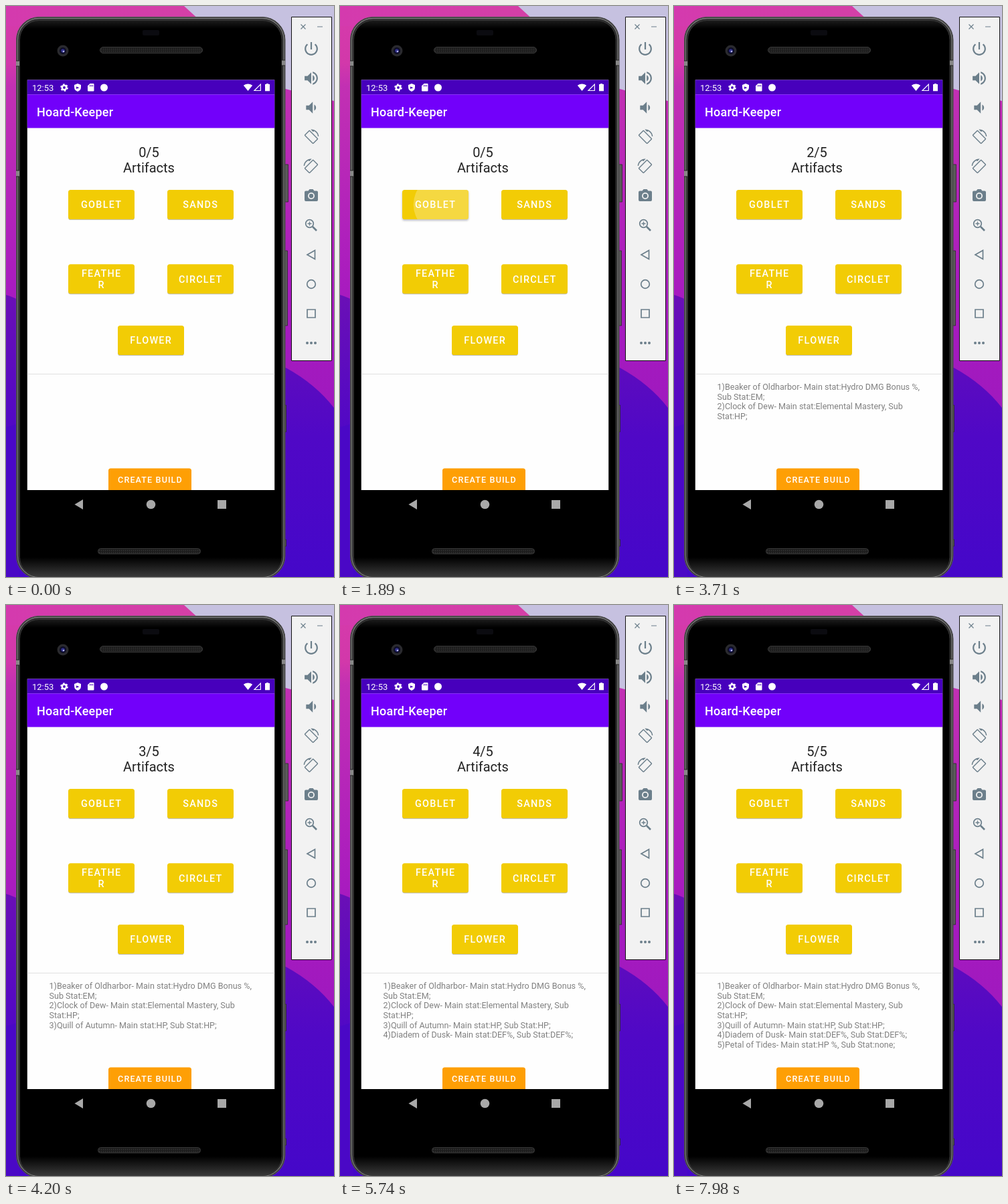
These frames come from a looping animation (490 by 854 pixels, 8 s). An HTML page:

```html
<!DOCTYPE html>
<html lang="en">
<head>
<meta charset="utf-8">
<title>Artifact builder</title>
<style>
html, body { margin: 0; width: 100%; height: 100%; overflow: hidden; background: #000; }
svg { display: block; width: 490px; height: 854px; font-family: Roboto, sans-serif; }
.label { fill: #fff; font-weight: 500; text-anchor: middle; }
.tool { fill: #6c7f8b; }
.line { fill: none; stroke: #6c7f8b; stroke-width: 1.7; }
</style>
</head>
<body>
<svg viewBox="0 0 490 854">
  <defs>
    <linearGradient id="pink" x2="0" y2="1">
      <stop offset="0" stop-color="#d63bab"/><stop offset=".1" stop-color="#d238aa"/>
      <stop offset=".14" stop-color="#c230b3"/><stop offset=".5" stop-color="#a81bbf"/>
      <stop offset="1" stop-color="#9316bd"/>
    </linearGradient>
    <linearGradient id="violet" x2="0" y2="1">
      <stop offset="0" stop-color="#6a0fb6"/><stop offset=".5" stop-color="#5008c6"/><stop offset="1" stop-color="#4507c9"/>
    </linearGradient>
    <linearGradient id="top"><stop offset="0" stop-color="#d43aae"/><stop offset="1" stop-color="#d440a6"/></linearGradient>
    <linearGradient id="face" x2="0" y2="1">
      <stop offset="0" stop-color="#1c1c1c"/><stop offset=".015" stop-color="#000"/>
      <stop offset=".965" stop-color="#000"/><stop offset="1" stop-color="#3a3a3a"/>
    </linearGradient>
    <pattern id="mesh" width="3" height="3" patternUnits="userSpaceOnUse">
      <path d="M0 0H3V3H0Z" fill="#1c1c1c"/><circle cx="1.5" cy="1.5" r=".8" fill="#3b3b3b"/>
    </pattern>
    <clipPath id="screen"><path d="M31.800 110.500H401.200V724H31.800Z"/></clipPath>
    <clipPath id="press"><rect id="pressBox" width="99" height="44" rx="3.6"/></clipPath>
  </defs>

  <!-- wallpaper -->
  <path d="M0 0H490V854H0Z" fill="url(#pink)"/>
  <path d="M0 0H300V30H0Z" fill="url(#top)"/>
  <path d="M266 0H490V142Q455 134 410 122L290 22Z" fill="#c6c1e0"/>
  <path d="M0 432Q14 436 30 446V560H300L418 541Q462 565 490 601V854H0Z" fill="url(#violet)"/>
  <path d="M0 630L20 624V854H0Z" fill="#4a08c6"/>

  <!-- phone -->
  <g fill="#5a5a5a" stroke="#222" stroke-width=".7">
    <path d="M415 237h6.500v56H415ZM414 366h6.500v112H414ZM415 597h3.500v40H415ZM415 798h3.500v10H415Z"/>
  </g>
  <rect x="15.500" y="16.500" width="401.500" height="840" rx="34" fill="#2b2b2b" stroke="#555"/>
  <rect x="17.500" y="18.500" width="397.500" height="836" rx="32" fill="none" stroke="#7c7c7c" stroke-width="1.300"/>
  <rect x="20.500" y="21.500" width="391.500" height="832" rx="29" fill="url(#face)" stroke="#3c3c3c" stroke-width=".8"/>
  <path d="M15 82h5v8h-5ZM15 246h5v9h-5ZM412 81h5v8h-5Z" fill="#888"/>
  <path d="M15 82h5M15 90h5M15 246h5M15 255h5M412 81h5M412 89h5" stroke="#222"/>
  <rect x="204" y="36" width="25" height="8" rx="2" fill="#0b0b10"/>
  <g fill="url(#mesh)" stroke="#3a3a3a">
    <rect x="140.500" y="61.500" width="153" height="9" rx="4.500"/>
    <rect x="137.500" y="811.500" width="153" height="8" rx="4"/>
  </g>
  <circle cx="85" cy="67" r="8.500" fill="#2a2a2e"/>
  <circle cx="85" cy="67" r="5" fill="#0c0c25"/>
  <circle cx="85" cy="67" r="2.800" fill="#30308a"/>
  <circle cx="86" cy="68" r="1.300" fill="#b9b9f0"/>

  <!-- app -->
  <g clip-path="url(#screen)">
    <path d="M31 110H402V724H31Z" fill="#fefefe"/>
    <path d="M31 110H402V132.300H31Z" fill="#4700bc"/>
    <path d="M31 132.300H402V182.600H31Z" fill="#7200fa"/>
    <path d="M31 550.500H402" stroke="#e1e1e1"/>
    <g fill="#fff">
      <text x="39" y="127" font-size="13">12:53</text>
      <text x="46" y="164.500" font-size="18" font-weight="500" letter-spacing=".22">Hoard-Keeper</text>
      <circle cx="87" cy="122" r="3.200" fill="none" stroke="#fff" stroke-width="2.600"/>
      <circle cx="87" cy="122" r="5" fill="none" stroke="#fff" stroke-width="1.600" stroke-dasharray="2.600 2.636"/>
      <path d="M107 116l5 2v3.500q0 4.500-5 6.500q-5-2-5-6.500V118Z"/>
      <path d="M105 120.500l4.500 1.700l-4.500 1.700Z" fill="#4700bc"/>
      <path d="M125.500 116h5q1 0 1 1v9.500q0 1-1 1h-7.500q-1 0-1-1V119.500Z"/>
      <path d="M125.500 118v2.500M127.500 118v2.500M129.500 118v2.500" stroke="#4700bc" stroke-width=".9"/>
      <circle cx="146.500" cy="122" r="5.500"/>
      <path d="M354.800 118.700q6.700-4.400 13.400 0L361.500 127Z"/>
      <path d="M371 126.500h9.300v-9.300Z" fill="none" stroke="#fff" stroke-width="1.200"/>
      <path d="M389 116h3v1h2v10.300h-7V117h2Z"/>
    </g>
    <g fill="#222" font-size="20" text-anchor="middle">
      <text id="count" x="213.500" y="225.500">0/5</text>
      <text x="213.500" y="249">Artifacts</text>
    </g>
    <g id="buttons"></g>
    <g clip-path="url(#press)"><circle id="ripple" fill="#fff"/></g>
    <g id="labels" class="label" font-size="14.400" letter-spacing="1.280"></g>
    <g id="list" fill="#808080" font-size="12.570"></g>
    <rect x="153" y="691.500" width="124" height="44" rx="3.600" fill="#fe9f05" style="filter:drop-shadow(0 1.200px .7px #0004)"/>
    <text class="label" x="215.500" y="713" font-size="12.570" letter-spacing="1.120">CREATE BUILD</text>
  </g>
  <g fill="#a8a8a8">
    <path d="M102.500 745.500L115 738v15Z"/><circle cx="216.500" cy="745.500" r="6.800"/><path d="M316 739h13v13h-13Z"/>
  </g>

  <!-- side toolbar -->
  <path d="M426.500 16.500H486.500V530.500H426.500Z" fill="#f2f2f2" stroke="#111"/>
  <path d="M440.500 27.500l7 7m0-7l-7 7M465 31h8" class="line" style="stroke-width:1.200"/>
  <g class="tool">
    <path transform="translate(442.800 50.800) scale(1.100)" d="M13 3h-2v10h2V3zm4.830 2.170l-1.420 1.420C17.990 7.860 19 9.810 19 12c0 3.870-3.130 7-7 7s-7-3.130-7-7c0-2.190 1.010-4.140 2.580-5.420L6.170 5.170C4.230 6.820 3 9.260 3 12c0 4.970 4.030 9 9 9s9-4.030 9-9c0-2.740-1.230-5.180-3.170-6.830z"/>
    <path transform="translate(442.800 94.800) scale(1.100)" d="M3 9v6h4l5 5V4L7 9H3zm13.500 3c0-1.770-1.020-3.290-2.500-4.030v8.050c1.480-.73 2.500-2.250 2.500-4.020zM14 3.230v2.060c2.890.86 5 3.540 5 6.710s-2.110 5.850-5 6.710v2.060c4.010-.91 7-4.490 7-8.770s-2.990-7.860-7-8.770z"/>
    <path transform="translate(442.800 138.800) scale(1.100)" d="M18.500 12c0-1.770-1.020-3.290-2.500-4.030v8.050c1.480-.73 2.500-2.250 2.500-4.020zM5 9v6h4l5 5V4L9 9H5z"/>
    <path id="turn" transform="translate(444.600 184.600) scale(.95)" fill-rule="evenodd" d="M16.480 2.520c3.270 1.550 5.610 4.720 5.970 8.480h1.500C23.440 4.840 18.290 0 12 0l-.66.03 3.810 3.810 1.330-1.320zM10.230 1.750c-.59-.59-1.540-.59-2.120 0L1.750 8.110c-.59.59-.59 1.540 0 2.120l12.020 12.020c.59.59 1.540.59 2.120 0l6.360-6.360c.59-.59.59-1.540 0-2.120L10.230 1.750zM14.830 21.190L2.810 9.170l6.360-6.360 12.020 12.020-6.360 6.360z"/>
    <use href="#turn" transform="matrix(-1 0 0 1 912 44)"/>
    <path d="M448 276.500h3.500l2-2.500h5l2 2.500h3.500q2 0 2 2v11.500q0 2-2 2h-16q-2 0-2-2v-11.500q0-2 2-2Z"/>
    <circle cx="456" cy="284" r="5" fill="#f2f2f2"/><circle cx="456" cy="284" r="3.200"/>
    <circle cx="450" cy="504" r="2"/><circle cx="456" cy="504" r="2"/><circle cx="462" cy="504" r="2"/>
  </g>
  <g class="line">
    <circle cx="453.500" cy="325.500" r="5.800"/>
    <path d="M458 330l6 6" stroke-width="2.600"/><path d="M450.500 325.500h6m-3-3v6" stroke-width="1.300"/>
    <path d="M450 372l11.500-6.500v13Z"/><circle cx="456" cy="416" r="6.300"/><path d="M450 454h12v12h-12Z"/>
  </g>
</svg>
<script>
const LOOP = 8000, STEP = 70, W = 99, H = 44;
const GROW = 225, FADE = 150;

// down: touch starts, hold: extra time before the fade, done: artifact is added
const presses = [
  { label: ['GOBLET'], x: 93, y: 275, down: 1815, hold: 120, done: 2310, dx: 25,
    lines: ['1)Beaker of Oldharbor- Main stat:Hydro DMG Bonus %,', 'Sub Stat:EM;'] },
  { label: ['SANDS'], x: 241, y: 275, down: 2730, hold: 0, done: 3080, dx: 10,
    lines: ['2)Clock of Dew- Main stat:Elemental Mastery, Sub', 'Stat:HP;'] },
  { label: ['FEATHE', 'R'], x: 93, y: 386.3, down: 3820, hold: 0, done: 4130, dx: 10,
    lines: ['3)Quill of Autumn- Main stat:HP, Sub Stat:HP;'] },
  { label: ['CIRCLET'], x: 241, y: 386.3, down: 4830, hold: 0, done: 5180, dx: 10,
    lines: ['4)Diadem of Dusk- Main stat:DEF%, Sub Stat:DEF%;'] },
  { label: ['FLOWER'], x: 167, y: 478, down: 5740, hold: 0, done: 6090, dx: 10,
    lines: ['5)Petal of Tides- Main stat:HP %, Sub Stat:none;'] }
];

const $ = id => document.getElementById(id);
const clamp = v => Math.max(0, Math.min(1, v));
const set = (el, attrs) => { for (const k in attrs) el.setAttribute(k, attrs[k]); };

function add(parent, tag, attrs, text = '') {
  const el = document.createElementNS('http://www.w3.org/2000/svg', tag);
  set(el, attrs);
  el.textContent = text;
  return parent.appendChild(el);
}

let row = 0;
for (const p of presses) {
  p.box = add($('buttons'), 'rect', { x: p.x, y: p.y, width: W, height: H, rx: 3.6, fill: '#f2cc05' });
  p.label.forEach((s, i) => add($('labels'), 'text', {
    x: p.x + W / 2 + 0.2,
    y: p.y + 27.3 + (i - (p.label.length - 1) / 2) * 16.9
  }, s));
  p.rows = p.lines.map(s => add($('list'), 'text', { x: 64.5, y: 574 + 14.68 * row++ }, s));
}

function draw(now) {
  const t = Math.floor(now % LOOP / STEP) * STEP;
  $('count').textContent = presses.filter(p => t >= p.done).length + '/5';
  $('ripple').setAttribute('opacity', 0);
  for (const p of presses) {
    const age = t - p.down;
    const out = clamp((age - GROW - p.hold) / FADE);
    const lift = clamp(age / 100) * (1 - clamp(out * 2));
    p.box.style.filter = `drop-shadow(0 ${1.2 + 2 * lift}px ${0.7 + lift}px rgba(0,0,0,.25))`;
    for (const r of p.rows) r.setAttribute('visibility', t >= p.done ? 'visible' : 'hidden');
    if (age < 0 || out === 1) continue;
    const grow = 1 - (1 - clamp(age / GROW)) ** 2;
    set($('pressBox'), { x: p.x, y: p.y });
    set($('ripple'), {
      cx: p.x + W / 2 + p.dx * (1 - grow),
      cy: p.y + H / 2,
      r: 30 + 25 * grow,
      opacity: 0.24 * clamp(age / 75) * (1 - out)
    });
  }
}

const start = performance.now();
function tick() {
  draw(performance.now() - start);
  requestAnimationFrame(tick);
}
tick();
</script>
</body>
</html>
```
